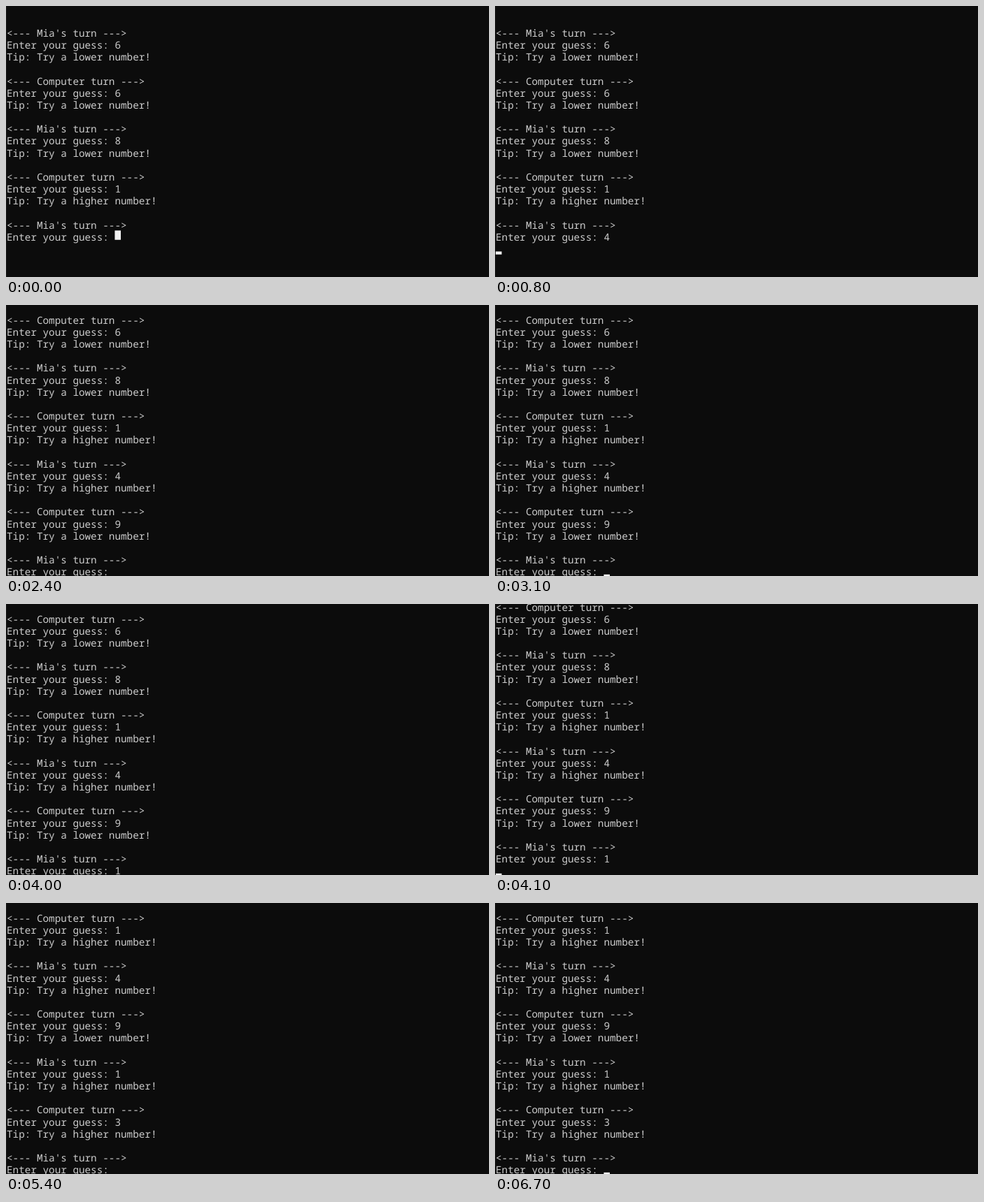
An HTML page with a canvas that plays this animation: 690 by 388 pixels, repeating every 7 s.

```html
<!DOCTYPE html>
<html lang="en">
<head>
<meta charset="utf-8">
<title>Guessing game</title>
<style>
  html, body { margin: 0; width: 100%; height: 100%; overflow: hidden; background: #0c0c0c; }
  canvas { display: block; }
</style>
</head>
<body>
<canvas id="stage" width="690" height="388"></canvas>
<script>
const LOOP = 7000;
// The console uses 9 by 18 cells, shown slightly reduced.
const SCALE = 0.9533, LEFT = 1, TOP = -4.6;
const CELL_W = 9, CELL_H = 18, BASELINE = 15;
const PROMPT = "Enter your guess: ";
const ctx = document.getElementById("stage").getContext("2d");

// Each turn fills four rows: heading, guess, tip, blank.
const turns = [
  ["Mia's", 6, "lower"], ["Computer", 6, "lower"],
  ["Mia's", 8, "lower"], ["Computer", 1, "higher"],
  ["Mia's", 4, "higher"], ["Computer", 9, "lower"],
  ["Mia's", 1, "higher"], ["Computer", 3, "higher"],
  ["Mia's", "", ""]
];
const lines = turns.flatMap(([player, guess, hint]) => [
  `<--- ${player} turn --->`, PROMPT + guess, `Tip: Try a ${hint} number!`, ""
]);

// scroll: rows moved up from the first view; turn: the one being played;
// typed: guess is visible; entered: cursor has moved to the next row.
const states = [
  { at: 0, scroll: 0, turn: 4 },
  { at: 500, scroll: 0, turn: 4, typed: true },
  { at: 800, scroll: 0, turn: 4, typed: true, entered: true },
  { at: 900, scroll: 5, turn: 6 },
  { at: 3900, scroll: 5, turn: 6, typed: true },
  { at: 4100, scroll: 6, turn: 6, typed: true, entered: true },
  { at: 4200, scroll: 13, turn: 8 }
];
const blinks = [300, 1400, 1900, 2400, 3000, 3500, 4100, 5100, 5600, 6100, 6700];

function drawCursor(column, row, from, to) {
  ctx.fillStyle = "#f2f2f2";
  ctx.fillRect(column * CELL_W, row * CELL_H + from, CELL_W, to - from);
}

function draw(time) {
  const state = states.findLast(s => s.at <= time);
  const promptLine = state.turn * 4 + 1;
  const firstRow = 2 - state.scroll;

  ctx.setTransform(1, 0, 0, 1, 0, 0);
  ctx.fillStyle = "#0c0c0c";
  ctx.fillRect(0, 0, 690, 388);
  ctx.fillStyle = "#1a1a1a";
  ctx.fillRect(0, 0, 1, 388);

  ctx.setTransform(SCALE, 0, 0, SCALE, LEFT, TOP);
  ctx.font = '15px "Noto Sans Mono", monospace';
  ctx.textRendering = "geometricPrecision";
  ctx.fillStyle = "#cccccc";
  for (let i = 0; i <= promptLine; i++) {
    const text = i === promptLine && !state.typed ? PROMPT : lines[i];
    ctx.fillText(text, 0, (firstRow + i) * CELL_H + BASELINE);
  }

  const column = state.entered ? 0 : PROMPT.length + (state.typed ? 1 : 0);
  const row = firstRow + promptLine + (state.entered ? 1 : 0);
  const cursorOn = blinks.filter(t => t <= time).length % 2 === 1;
  if (time < 500) drawCursor(column, row, 0, 14);
  if (cursorOn) drawCursor(column, row, 13.5, 18);
}

function tick() {
  draw(performance.now() % LOOP);
  requestAnimationFrame(tick);
}
tick();
</script>
</body>
</html>
```
